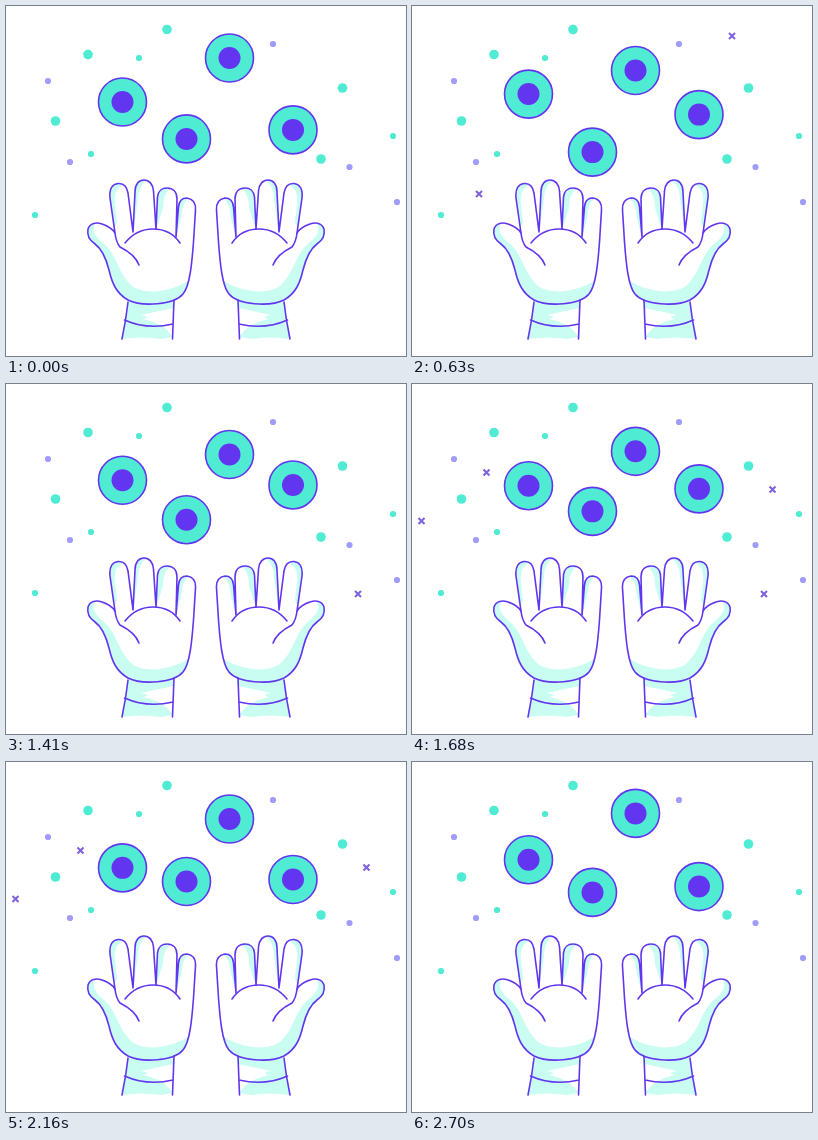
Recreate the animation shown at these times as an HTML page. Size 400 by 350 pixels, loop 2730 ms.

```html
<!DOCTYPE html>
<html lang="en">
<head>
<meta charset="utf-8">
<title>Juggling coins</title>
<style>
  html, body { margin: 0; width: 100%; height: 100%; overflow: hidden; background: #fff; }
  svg { display: block; width: 100vw; height: 100vh; }
  .line { fill: none; stroke: #6236f0; stroke-width: 1.6; stroke-linecap: round; stroke-linejoin: round; }
  .pale { fill: #c9fdf1; }
  .teal { fill: #50ebd3; }
  .lilac { fill: #a09cfa; }
  .mark { fill: #6236f0; }
  .cross { fill: none; stroke: #7f62dc; stroke-width: 2.1; }
</style>
</head>
<body>
<svg id="stage" viewBox="0 0 400 350">
  <defs>
    <path id="palm" d="M122 294 C110 287 106 277 103 264 C100 252 96 243 89 238 C83 234 81 228 82 223
      C84 217 90 216 96 218 C102 220 106 222 109 227 L104 192 C103 182 107 178 112 177.500 C118 177 121 181 122 187
      L127 226 L129 186 C129 178 133 174 138 174 C143 174 147 178 147.500 185 L150 223 L151.500 191
      C152 185 156 182 161 182 C167 182 171 186 171 193 L170 231 L172.500 201 C173 195 176 192 181 192
      C187 193 190 197 189.500 204 L187.500 236 C186 256 184 280 177 288 C168 299 136 301 122 294 Z"/>
    <clipPath id="inPalm"><use href="#palm"/></clipPath>
    <g id="hand">
      <path class="pale" d="M122 296 L116 333 Q136 330 155 333 L166.500 331 L168 293 Z"/>
      <path fill="#fff" d="M135 309 Q148 306 167.500 302 L166.500 331 Q158 317 137 313 Q146 311 135 309 Z"/>
      <use href="#palm" fill="#fff"/>
      <g class="pale" clip-path="url(#inPalm)">
        <path d="M78 218 L90 216 C85 224 89 231 97 237 C111 248 111 266 126 280 C140 290 171 286 190 269 V304 H100 Z"/>
        <path d="M108 224 L102 178 H119 Q107 182 109 198 L111 216 Z"/>
        <path d="M127 228 V174 H141 Q132 180 132 194 Z"/>
        <path d="M150 224 V182 H166 Q157 186 157 202 Z"/>
        <path d="M170 232 V192 H184 Q176 196 175.500 210 Z"/>
      </g>
      <use href="#palm" class="line"/>
      <path class="line" d="M109 227 Q110 236 114 241 C124 246 130 251 133 259
        M119 237 C127 227 136 223 147 223 C159 223 168 228 174 237
        M122 296 Q120 314 116 333 M168 294 L166.500 333 M118.500 314 Q141 324 167 318"/>
    </g>
  </defs>
  <use href="#hand"/>
  <use href="#hand" transform="matrix(-1 0 0 1 400 0)"/>
</svg>
<script>
const LOOP = 2730, STEP = 30;
const SWING = 2780;           // one full bob, cut slightly short by the loop
const LIFE = 810, POP = 90;   // cross: time on screen, time to grow or shrink
const stage = document.getElementById('stage');

function add(parent, tag, attrs) {
  const el = document.createElementNS('http://www.w3.org/2000/svg', tag);
  for (const key in attrs) el.setAttribute(key, attrs[key]);
  return parent.appendChild(el);
}

function dots(cls, r, ...places) {
  for (const [cx, cy] of places) add(stage, 'circle', { class: cls, cx, cy, r });
}

function coin(x, mid, swing, peak) {
  const el = add(stage, 'g');
  add(el, 'circle', { class: 'teal', r: 24 });
  add(el, 'circle', { class: 'line', r: 24 });
  add(el, 'circle', { class: 'mark', r: 11 });
  // A sine that lingers a little around its peak.
  return t => {
    const a = 2 * Math.PI * (t - peak) / SWING;
    const y = mid + swing * (Math.cos(a) + 0.12 * Math.sin(a) ** 2);
    el.setAttribute('transform', `translate(${x} ${y.toFixed(2)})`);
  };
}

function cross(x, y, from) {
  const el = add(stage, 'path', { class: 'cross', d: 'M-3 -3 L3 3 M3 -3 L-3 3' });
  return t => {
    const age = t - from;
    const size = Math.max(0, Math.min(1, age / POP, (LIFE - age) / POP));
    el.setAttribute('visibility', size ? 'visible' : 'hidden');
    el.setAttribute('transform', `translate(${x} ${y}) scale(${size})`);
  };
}

dots('teal', 4.8, [161, 23.5], [82, 48.5], [49.5, 115], [336.5, 82], [315, 153]);
dots('teal', 3.1, [133, 52], [85, 148], [29, 209], [387, 130]);
dots('lilac', 3.1, [42, 75], [64, 156], [267, 38], [343.5, 161], [391, 196]);

const parts = [
  coin(116.5, 97, -9, 700),
  coin(223.5, 61.2, 10, 1230),
  coin(180.5, 133, 13.5, 750),
  coin(287, 112.5, -12.3, 1235),
  cross(67, 188, 240),
  cross(320, 30, 540),
  cross(352, 210, 960),
  cross(74.5, 88.5, 1440),
  cross(9.5, 137, 1440),
  cross(360.5, 105.5, 1440)
];

const start = performance.now();
function tick() {
  const t = Math.floor((performance.now() - start) % LOOP / STEP) * STEP;
  parts.forEach(move => move(t));
  requestAnimationFrame(tick);
}
tick();
</script>
</body>
</html>
```
